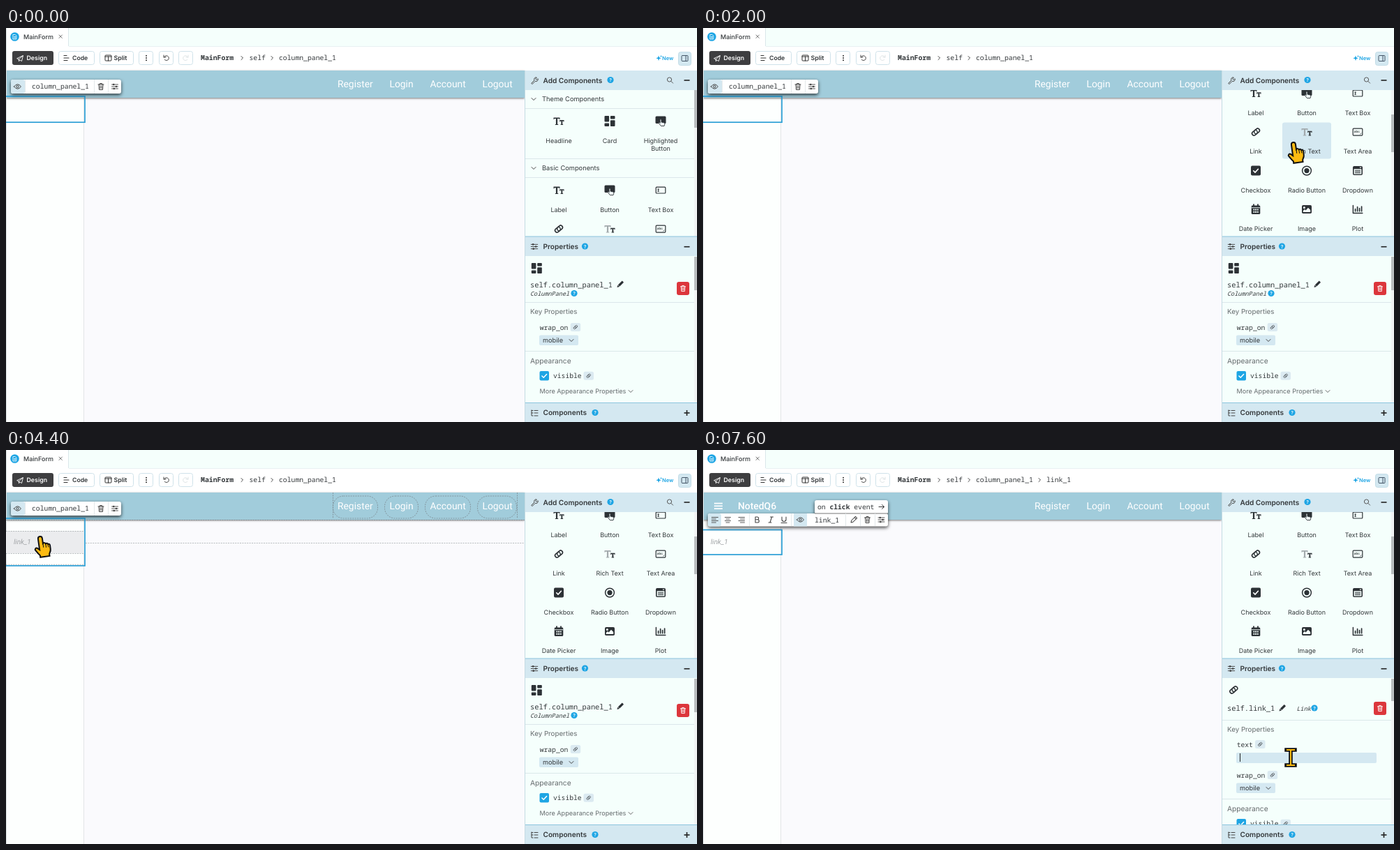
These frames come from a looping animation (990 px wide and 565 px high, 8 s). An HTML page:

```html
<!DOCTYPE html>
<html lang="en">
<head>
<meta charset="utf-8">
<title>Form designer</title>
<style>
html, body { margin: 0; width: 100%; height: 100%; overflow: hidden; background: #fff; }
svg { display: block; width: 990px; height: 565px; }
text { font: 400 9px Inter, sans-serif; fill: #34383b; text-rendering: geometricPrecision; white-space: pre; }
.mono { font-family: "Noto Sans Mono", monospace; }
.app { font-family: Roboto, sans-serif; }
.medium { font-weight: 500; }
.bold { font-weight: 600; }
.italic { font-style: italic; }
.mid { text-anchor: middle; }
.soft { fill: #666b6e; }
.white { fill: #fff; }
.blue { fill: #1ea5e4; }
.hint { fill: #a2a5a8; }
.shadow { filter: drop-shadow(0 2px 2.5px #000b); }
.dash { fill: none; stroke: #7c8890; stroke-width: .8; stroke-dasharray: 2 1.4; }
.pale { stroke: #a6acaf; }
.pick { fill: none; stroke: #2b9fd6; stroke-width: 1.7; }
</style>
</head>
<body>
<svg id="stage" viewBox="0 0 990 565"></svg>
<script>
const DARK = '#2d3236', BLUE = '#1ea5e4', PALE = '#d4e8f1', MINT = '#f5fffc', LINE = '#dbe7ea';

const text = (x, y, str, size = 9, cls = '') =>
  `<text x="${x}" y="${y}" class="${cls}" style="font-size:${size}px">${str}</text>`;
const rect = (x, y, w, h, fill, r = 0, attrs = '') =>
  `<rect x="${x}" y="${y}" width="${w}" height="${h}" rx="${r}" fill="${fill}" ${attrs}/>`;
const path = (d, stroke = DARK, width = 1.2, fill = 'none') =>
  `<path d="${d}" stroke="${stroke}" stroke-width="${width}" fill="${fill}" stroke-linecap="round" stroke-linejoin="round"/>`;
const solid = (d, fill = DARK) => `<path d="${d}" fill="${fill}"/>`;
const disc = (x, y, r, fill) => `<circle cx="${x}" cy="${y}" r="${r}" fill="${fill}"/>`;
const at = (x, y, art, scale = 1) => `<g transform="translate(${x} ${y}) scale(${scale})">${art}</g>`;
const group = (id, ...art) => `<g id="${id}">${art.join('')}</g>`;
const dashes = (d, cls = '') => `<path class="dash ${cls}" d="${d}"/>`;
const rule = y => rect(744, y, 242, 1, LINE);
const separators = (y, h, ...xs) => xs.map(x => rect(x, y, 1, h, '#e3e8ea')).join('');
const chevron = (x, y, color = '#444') => path(`M${x - 3} ${y - 1.5}l3 3 3-3`, color, 1);
const arrowRight = x => path(`M${x - 1.5} 40.5l2.5 2.5-2.5 2.5`, '#444', 1);
const help = (x, y) => disc(x, y, 4.6, BLUE) + text(x, y + 2.5, '?', 6.8, 'mid bold white');

const BIG_T = 'M-7.5-5h9v2.6h-1v-1h-2.4v7.9h1.1v1h-4.4v-1h1.1v-7.9h-2.4v1h-1z';
const SMALL_T = 'M1.2-1.4h6.3v2.2h-1.1v-.8h-1.1v4.5h.8v1h-3.5v-1h.8v-4.5h-1.1v.8h-1.1z';
const TICK = 'M-3.3 .2l2.3 2.3 4.4-4.8';
const icons = {
  headline: solid(BIG_T) + solid(SMALL_T),
  rich: solid(BIG_T, '#a3aaad') + solid(SMALL_T),
  card: rect(-7.5, -7.5, 6.6, 8.6, DARK, 1) + rect(-7.5, 3, 6.6, 4.5, DARK, 1) +
    rect(.9, -7.5, 6.6, 4.5, DARK, 1) + rect(.9, -1.2, 6.6, 8.7, DARK, 1),
  button: rect(-7.5, -7, 15, 10.5, DARK, 1.5) +
    path('M-1-1.5c0-1.6 2-1.6 2 0v3l3.6.8c1.4.4 1.4 1.4 1 3l-.6 1.7h-4.6l-3.2-4c-.6-1.4.8-1.6 1.8-.4z', DARK, .9, '#eef6f7'),
  textBox: rect(-6.8, -4.4, 13.6, 8.8, 'none', 1, `stroke="${DARK}" stroke-width="1.2"`) + path('M-4.4-1.5h2M-3.4-1.5v3M-4.4 1.5h2', DARK, .9),
  textArea: rect(-6.8, -5, 13.6, 10, 'none', 1, `stroke="${DARK}" stroke-width="1.2"`) +
    text(-5.2, .8, 'abc', 4.6, 'bold') + path('M3.8 3.2l1.4-1.4', DARK, .8),
  link: `<g transform="rotate(-40)">${path('M1-2.8h-4.4a2.8 2.8 0 0 0 0 5.6h2.4M-1 2.8h4.4a2.8 2.8 0 0 0 0-5.6h-2.4', DARK, 1.6)}${path('M.8-2.8a2.8 2.8 0 0 1 0 5M-.8 2.8a2.8 2.8 0 0 1 0-5', DARK, 1.4)}</g>`,
  checkbox: rect(-7, -7, 14, 14, DARK, 2) + path(TICK, '#fff', 1.6),
  radio: `<circle r="6.4" fill="none" stroke="${DARK}" stroke-width="1.5"/>` + disc(0, 0, 3.6, DARK),
  dropdown: rect(-7, -6.5, 14, 13, DARK, 2) + rect(-5.4, -2.4, 10.8, 7.4, MINT) +
    path('M-3.6-.4h7.2M-3.6 1.4h7.2M-3.6 3.2h7.2', DARK, .9) + solid('M2.5-5h3l-1.5 1.6z', '#fff'),
  date: path('M-3-7v2M3-7v2', DARK, 1.8) + rect(-6.3, -5.5, 12.6, 12.5, DARK, 1.5) + rect(-6.3, -2.8, 12.6, .9, MINT) +
    [-3.6, -.9, 1.8].map(x => rect(x, -.5, 1.9, 1.9, MINT) + rect(x, 2.8, 1.9, 1.9, MINT)).join(''),
  image: rect(-7, -6, 14, 12, DARK, 1.8) + disc(-3.6, -2.6, 1.5, MINT) + solid('M-5.2 4v-2l2.2-2.2 1.6 1.6 3.4-3.8 3.2 3.4v3z', MINT),
  plot: path('M-6.6-5.5v11h13.4', DARK, 1.5) + path('M-3.4 2.6v-3M-.4 2.6v-6M2.6 2.6v-4M5.6 2.6v-6.6', DARK, 1.7),
  eye: path('M-5 0q5-6.6 10 0q-5 6.6-10 0z', '#444', 1) + '<circle r="1.6" fill="none" stroke="#444"/>',
  sliders: path('M-4.5-3h9M-4.5 0h9M-4.5 3h9', '#444', .9) + disc(-1.8, -3, 1.3, '#444') + disc(2, 0, 1.3, '#444') + disc(-1.2, 3, 1.3, '#444'),
  pencil: `<g transform="rotate(45)">${rect(-1.7, -5.6, 3.4, 8.4, DARK, .8)}${solid('M-1.7 3.2h3.4l-1.7 3.2z')}</g>`,
  outlinePencil: `<g transform="rotate(45)">${path('M-1.6-5h3.2v8l-1.6 2.6-1.6-2.6zM-1.6-3h3.2', '#444', 1)}</g>`,
  tree: path('M-4-4v8h2M-4 0h2M-4-3.5h2M0-3.5h5M0 0h5M0 4h5', '#444', 1)
};
const icon = (name, x, y, scale) => at(x, y, icons[name], scale);
const trash = (x, y, color = '#444') => at(x, y, path('M-4-3h8M-1.5-3v-1.5h3v1.5M-3-3l.5 7.5h5l.5-7.5M-1-1v3.6M1-1v3.6', color, 1));
const linkChip = (x, y) => rect(x, y, 14.5, 12, '#dbeaf1', 2.5) + `<g opacity=".75">${icon('link', x + 7.2, y + 6, .52)}</g>`;
const dropdownField = y => rect(764, y, 56, 14.5, PALE, 2) + text(769, y + 10.3, 'mobile', 9.2) + chevron(810, y + 7.5);
const deleteButton = y => rect(961, y, 18, 19, '#dc363c', 3) + at(970, y + 9.5, trash(0, 0, '#fff'), .9);
const toolButton = (x, w, art) => rect(x + .5, 33.5, w, 19, '#fff', 3, 'stroke="#cfe2ea"') + art;

function topBars() {
  return rect(0, 0, 990, 26, MINT) + rect(0, 0, 89, 26, '#fff') + rect(89, 0, 1, 26, LINE) + rect(90, 26, 900, 1, '#e9f1f2') +
    disc(12.5, 12.5, 6.3, BLUE) + path('M10.3 9.5h3l1.5 1.5v5h-4.5zM11.5 12.5h2M11.5 14.2h2', '#fff', .8) +
    text(25, 15.7, 'MainForm', 9, 'medium') + path('M76 10l4.4 4.4M80.4 10l-4.4 4.4', '#666', .9) +
    rect(9, 33, 59, 20, '#3e3e40', 3) + path('M16 43.5l8.5-4-2 8-3-1.7-1 2-.3-2.8zM18.2 45l6-5.2', '#fff', .9) +
    text(29.5, 46.3, 'Design', 8.8, 'bold white') +
    toolButton(75, 51, path('M83 39.5h4M83 43h7M83 46.5h5', '#333', 1.2) + text(95, 46.3, 'Code', 8.7, 'bold')) +
    toolButton(134, 48, rect(142, 39, 9, 8, 'none', 1, 'stroke="#333"') + path('M142 41h9M146.5 41v6', '#333', 1) + text(154.5, 46.3, 'Split', 8.8, 'bold')) +
    toolButton(190, 20, [39.8, 43, 46.2].map(y => disc(201, y, 1, '#333')).join('')) +
    toolButton(219, 20, path('M226 39v3h3M226.3 42q1.5-2.6 4-2.2a3.4 3.4 0 1 1-3 5.6', '#444', 1)) +
    toolButton(247, 20, path('M261 39v3h-3M260.7 42q-1.5-2.6-4-2.2a3.4 3.4 0 1 0 3 5.6', '#dde3e5', 1)) +
    text(279, 46.2, 'MainForm', 9.8, 'mono bold') + arrowRight(338.5) + text(348.5, 46.2, 'self', 9.75, 'mono') +
    arrowRight(381.5) + text(391, 46.2, 'column_panel_1', 9.75, 'mono') +
    solid('M935 39.5l1 2.7 2.7 1-2.7 1-1 2.7-1-2.7-2.7-1 2.7-1zM938.5 39l.4 1.1 1.1.4-1.1.4-.4 1.1-.4-1.1-1.1-.4 1.1-.4z', BLUE) +
    text(940, 46, 'New', 7.5, 'bold blue') +
    rect(963.5, 34.5, 18, 19, PALE, 3, 'stroke="#c2dce7"') + rect(968, 39.5, 9, 8, 'none', 1, 'stroke="#456"') + path('M974 39.5v8', '#456', 1);
}

function appCanvas() {
  const pill = (x, end) => rect(x, 66, end - x, 32, 'none', 15, 'class="dash"');
  const pickBox = (y, h) => rect(-2, y, 115, h, 'none', 0, 'class="pick"');
  return rect(0, 61, 743, 504, '#fafafd') + rect(0, 100, 111, 465, '#fdfffe') + rect(111, 100, 1, 465, '#e3e5e7') +
    rect(0, 61, 743, 39, '#a1ccdb', 0, 'style="filter:drop-shadow(0 1.5px 1.5px #0008)"') + rect(0, 0, 1, 565, '#d9dfe1') +
    [75.7, 79.5, 83.3].map(y => rect(16, y, 12, 1.7, '#fff')).join('') + text(50, 85.3, 'NotedQ6', 13.85, 'app medium white') +
    [['Register', 475], ['Login', 549.5], ['Account', 607.5], ['Logout', 682.5]].map(([s, x]) => text(x, 85.4, s, 13.85, 'app white')).join('') +
    group('outlines', dashes('M468.5 61V98.5M732.5 61V98.5M0 100.5H743'), pill(468.5, 532.5), pill(542.5, 590.5), pill(600.5, 665.5), pill(675.5, 731.5)) +
    group('rowOutline', dashes('M0 133.5H743', 'pale')) +
    group('panelPick', pickBox(98, 37.2)) +
    group('dropSlot', dashes('M114 133.5H743', 'pale'), rect(0, 116, 112, 32, '#ebecee'),
      dashes('M0 116.5H112M0 148.5H112M0 164.3H112', 'pale'), pickBox(98, 68)) +
    group('linkPick', pickBox(114.5, 35.5)) +
    group('linkHint', text(11, 134.7, 'link_1', 10, 'app italic hint')) +
    group('panelChip', rect(7, 74, 158, 20, '#fff', 3, 'class="shadow"'), rect(7, 74, 20, 20, PALE, 3), icon('eye', 16.5, 84),
      text(37, 87.2, 'column_panel_1', 9.75, 'mono'), separators(74, 20, 27, 126, 146), trash(136, 84), icon('sliders', 156, 84)) +
    group('linkToolbar', rect(160, 72, 105, 20, '#fff', 3, 'class="shadow"'), rect(7, 91, 258, 18.5, '#fff', 3, 'class="shadow"'),
      rect(160.5, 72.5, 104, 20, '#fff', 3), rect(160, 90.5, 105, 1, '#777'),
      text(164, 85, 'on <tspan class="bold">click</tspan> event', 9.7, 'mono'), path('M252 81.5h7.5M256.5 78.5l3 3-3 3', '#333', 1),
      rect(7, 91, 19, 18.5, PALE, 3), rect(130, 91, 19, 18.5, PALE), separators(91, 18, 66, 126, 204, 225, 246),
      path('M12.5 96.5h9M12.5 99h6M12.5 101.5h9M12.5 104h6M31.5 96.5h8M33 99h5M31.5 101.5h8M33 104h5M51 96.5h8.5M53.5 99h6M51 101.5h8.5M53.5 104h6', '#444', .9),
      path('M75 96v8h3.2a2 2 0 0 0 0-4.2h-3.2M75 96h2.8a1.9 1.9 0 0 1 0 3.8M96.5 96h4M94 104h4M98.6 96l-2.6 8M113 96v3.5a3 3 0 0 0 6 0v-3.5M112 104.5h8', '#444', 1.1),
      icon('eye', 139.5, 100), text(160, 103.5, 'link_1', 9.75, 'mono'), icon('outlinePencil', 216, 100), trash(235.5, 100), icon('sliders', 255.5, 100));
}

function componentList() {
  const columns = [792, 865, 938];
  const cells = [
    [['headline', 'Label'], ['button', 'Button'], ['textBox', 'Text Box']],
    [['link', 'Link'], ['rich', 'Rich Text'], ['textArea', 'Text Area']],
    [['checkbox', 'Checkbox'], ['radio', 'Radio Button'], ['dropdown', 'Dropdown']],
    [['date', 'Date Picker'], ['image', 'Image'], ['plot', 'Plot']]
  ];
  const cell = ([name, label], col, y) => icon(name, columns[col], y) + text(columns[col], y + 31, label, 9, 'mid');
  return chevron(756, 102) + text(768, 105, 'Theme Components', 9.3) + rule(115) +
    [['headline', 'Headline'], ['card', 'Card'], ['button', 'Highlighted']].map((c, i) => cell(c, i, 133.5)).join('') +
    text(938, 176.3, 'Button', 9, 'mid') + rule(187) + chevron(756, 201) + text(768, 204.3, 'Basic Components', 9.3) + rule(214) +
    group('hoverRich', rect(830, 274.5, 70, 52, PALE, 3)) + group('hoverLink', rect(757.3, 274.7, 69.4, 51.6, PALE, 3.5, 'id="linkCell"')) +
    cells.map((row, r) => row.map((c, i) => cell(c, i, 232.6 + 55.5 * r)).join('')).join('');
}

function sidePanel() {
  const header = (y, label) => rect(744, y, 246, 28, PALE) + text(769.5, y + 17.8, label, 10.1, 'bold');
  const minus = y => rect(971.5, y - .8, 8, 1.6, '#222');
  return rect(743, 61, 247, 504, MINT) +
    `<clipPath id="listClip"><path d="M744 89h246v210h-246z"/></clipPath><g clip-path="url(#listClip)">${group('list', componentList())}</g>` +
    rect(986, 89, 4, 210, '#f1f4f4') + rect(986, 89, 4, 54, '#b9bdbf', 0, 'id="listThumb"') +
    header(61, 'Add Components') + help(866, 74.5) + path('M753 79l4-4a2.8 2.8 0 0 1 3.4-4l-1.7 1.8 1.6 1.6 1.7-1.7a2.8 2.8 0 0 1-3.8 3.6l-4 4z', '#444', 1) +
    '<circle cx="950.5" cy="74" r="3.1" fill="none" stroke="#555"/>' + path('M953 76.5l2.6 2.6', '#555', 1) + minus(75) +
    rect(744, 299, 246, 238, MINT) + header(299, 'Properties') + rect(744, 298.5, 246, 1, '#8cc4dd') + help(829.5, 313) + icon('sliders', 757, 313.5, 1.05) + minus(313.7) +
    group('panelProps', icon('card', 760.3, 344.5), text(751, 371.7, 'self.column_panel_1', 10.35, 'mono'), icon('pencil', 880, 367.5),
      text(751, 383.7, 'ColumnPanel', 8.5, 'mono italic'), help(814, 380.5), deleteButton(364), rule(393), text(751, 410.4, 'Key Properties', 9.75, 'soft')) +
    group('linkProps', icon('link', 760.3, 344), text(751, 374.2, 'self.link_1', 10.35, 'mono'), icon('pencil', 830, 370),
      text(850.5, 373.5, 'Link', 8.5, 'mono italic'), help(876, 370), deleteButton(361), rule(387), text(751, 404, 'Key Properties', 9.75, 'soft'),
      text(764.7, 425.6, 'text', 9.7, 'mono medium'), linkChip(791, 416), rect(764, 434, 201, 15, PALE, 2)) +
    group('sharedProps', text(764.7, 432.6, 'wrap_on', 9.7, 'mono medium'), linkChip(808.7, 423), dropdownField(440.5), rule(463),
      text(751, 480.6, 'Appearance', 10.2, 'soft'), rect(764.5, 492, 13.5, 13.5, BLUE, 2), at(771.2, 498.8, path(TICK, '#fff', 1.5)),
      text(784, 502.2, 'visible', 9.7, 'mono medium'), linkChip(827.5, 492.8), text(764.5, 524.3, 'More Appearance Properties', 9.1, 'soft'), chevron(895, 521, '#666')) +
    rect(986, 328, 4, 209, '#f1f4f4') + rect(986, 328, 4, 48, '#b9bdbf', 0, 'id="propsThumb"') +
    header(537.5, 'Components') + rect(744, 537, 246, 1, '#8cc4dd') + help(844, 551.5) + icon('tree', 757, 552) +
    minus(552) + rect(974.7, 548, 1.6, 8, '#222') + rect(743, 61, 1, 504, '#c5dbe3');
}

function pointers() {
  const beam = 'M-6-11H6M0-11V11M-6 11H6';
  const hand = 'M-3 3a3 3 0 0 1 6 0V10.5c1.2-1.2 3.4-.6 3.8 1 1.2-1 3-.4 3.3 1.2 1.2-.7 2.5.2 2.5 1.9V20c0 3.4-2 4.8-2.6 7v2.6H-3.4v-2.6c-1.8-2-3.6-4.8-5.4-7.8-1.5-2.4 1-4.5 3-2.9l2.8 2.6z';
  const filled = 'fill="#fdbb12" stroke="#111" stroke-width="2"';
  return group('caret', rect(769, 435, 1, 12, '#222')) + group('pointer',
    group('arrow', `<path d="M1 2V24L6 19.3 10 27.5 14.2 25.5 10.5 17.6H17Z" ${filled}/>`),
    group('hand', `<g transform="rotate(-8)"><path d="${hand}" ${filled}/>${path('M3 11v5M6.8 12v4.5M10 13.5v3', '#111', 1)}</g>`),
    group('beam', `<path d="${beam}" fill="none" stroke="#111" stroke-width="5.5" stroke-linecap="square"/><path d="${beam}" fill="none" stroke="#fdbb12" stroke-width="2"/>`));
}

const $ = id => document.getElementById(id);
$('stage').innerHTML = topBars() + group('crumb', arrowRight(482.5), text(492, 46.2, 'link_1', 9.75, 'mono')) + appCanvas() + sidePanel() + pointers();

const LOOP = 8000, DRAG = 3000, DROP = 4700;
// time, x, y of the pointer's hot spot
const route = [[450, 985, 572], [1000, 900, 129], [1400, 856, 158], [1800, 845.5, 164], [2100, 845.5, 164], [2500, 787, 149],
  [3300, 787, 149], [4200, 48.5, 124], [5200, 48.5, 124], [5900, 802, 404], [6500, 802, 404], [7000, 842, 441]];
const ease = p => p * p * (3 - 2 * p);
const progress = (t, from, to) => ease(Math.min(1, Math.max(0, (t - from) / (to - from))));

function pointerAt(t) {
  let [, x, y] = route[0];
  for (let i = 1; i < route.length && t > route[i - 1][0]; i++) {
    const [from, x0, y0] = route[i - 1], [to, x1, y1] = route[i], p = progress(t, from, to);
    x = x0 + (x1 - x0) * p;
    y = y0 + (y1 - y0) * p;
  }
  return [x, y];
}

const show = (id, on) => $(id).style.display = on ? '' : 'none';

function draw(t) {
  const dragging = t >= DRAG && t < DROP, dropped = t >= DROP, overSlot = t >= 4000 && t < DROP;
  const scroll = progress(t, 1350, 1950);
  $('list').setAttribute('transform', `translate(0 ${-139 * scroll})`);
  $('listThumb').setAttribute('y', 89 + 35 * scroll);
  $('propsThumb').setAttribute('height', dropped ? 32 : 48);
  $('sharedProps').setAttribute('transform', `translate(0 ${dropped ? 37 : 0})`);
  $('linkCell').setAttribute('stroke', dragging ? '#3ba8dc' : 'none');

  show('outlines', dragging);
  show('rowOutline', dragging && !overSlot);
  show('panelPick', t < DRAG);
  show('dropSlot', overSlot);
  show('linkHint', overSlot || dropped);
  for (const id of ['panelChip', 'panelProps']) show(id, !dropped);
  for (const id of ['crumb', 'linkPick', 'linkToolbar', 'linkProps']) show(id, dropped);
  show('hoverRich', t >= 1800 && t < 2290);
  show('hoverLink', t >= 2310 && t < 3600);

  const [x, y] = pointerAt(t);
  const hand = t >= 1300 && t < 5350, beam = t >= 6780;
  $('pointer').setAttribute('transform', `translate(${x} ${y})`);
  show('pointer', t >= 450);
  show('hand', hand);
  show('beam', beam);
  show('arrow', !hand && !beam);
  show('caret', t >= 7200);
}

const start = performance.now();
(function tick() {
  draw((performance.now() - start) % LOOP);
  requestAnimationFrame(tick);
})();
</script>
</body>
</html>
```
